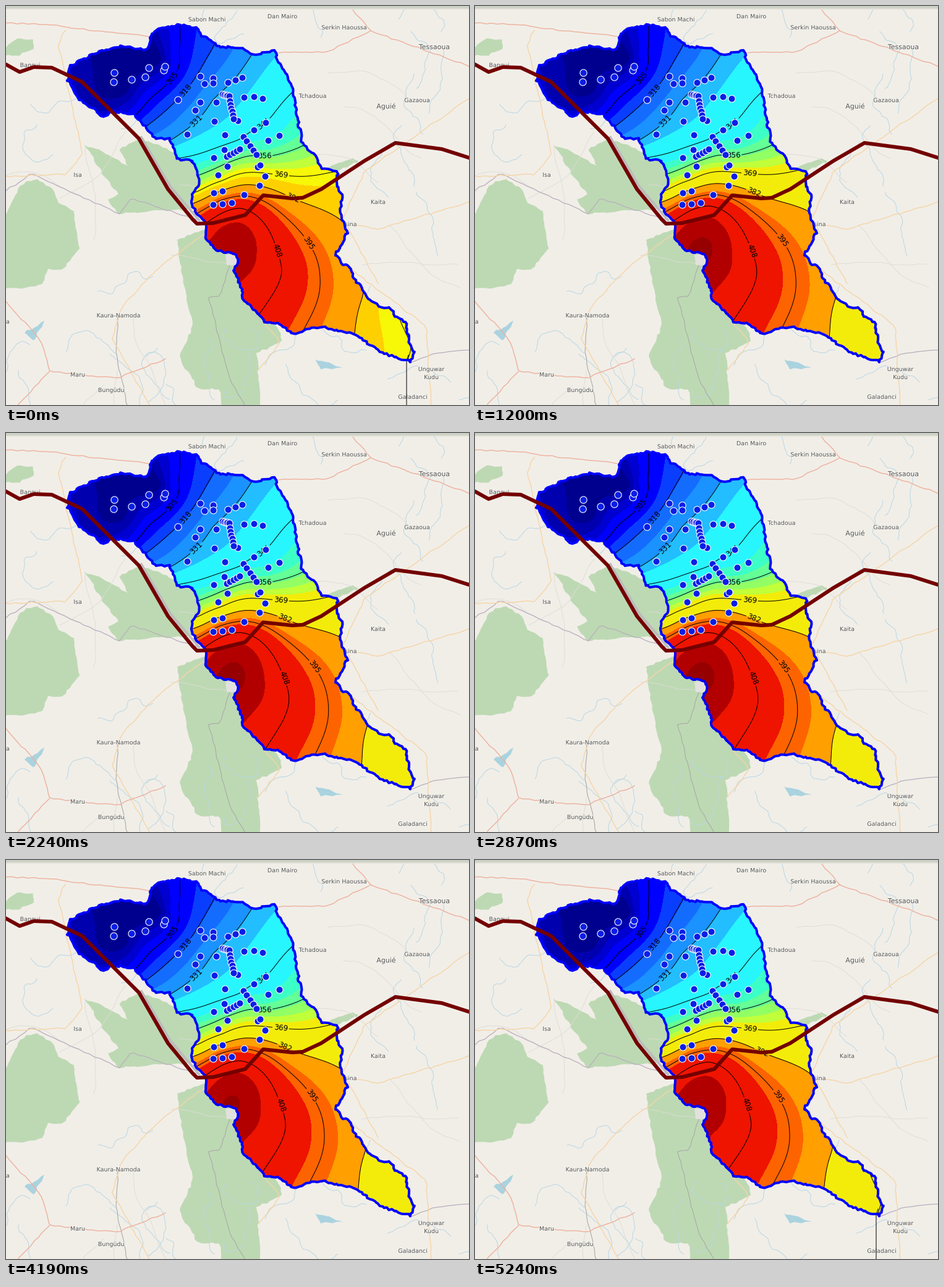
Recreate the animation shown at these times as a matplotlib script. Size 749 px wide and 647 px high, loop 5690 ms.

```python
import math
import numpy as np
import matplotlib.pyplot as plt
from matplotlib.animation import FuncAnimation
from matplotlib.patches import Polygon
from matplotlib.patheffects import withStroke

W, H, DPI = 749, 647, 64
PX = 72 / DPI
STEP = 10
HOLDS = [300, 900, 1040, 1050, 900, 1050, 450]
STARTS = np.cumsum([0] + HOLDS[:-1])
LOOP = sum(HOLDS)

# Key corners of the region, clockwise from the north.
NORTH_EAST = [
    (236, 45), (248, 36), (282, 30), (310, 36), (316, 47), (345, 66), (383, 68), (400, 80),
    (435, 72), (440, 90), (462, 125), (470, 175), (480, 225), (500, 243), (512, 263), (536, 268),
    (536, 290), (544, 310), (541, 335), (552, 368), (533, 403), (546, 420), (558, 424),
    (562, 440), (585, 472), (605, 488), (620, 488), (632, 505), (648, 515), (653, 550),
    (660, 560), (655, 577)]
SOUTH_WEST = [
    (610, 563), (565, 533), (510, 520), (490, 524), (468, 533), (440, 514), (420, 512),
    (384, 475), (380, 455), (367, 428), (375, 420), (374, 404), (340, 396), (322, 378),
    (324, 352), (300, 325), (302, 305), (312, 290), (310, 268), (300, 250), (276, 248),
    (265, 215), (243, 215), (205, 175), (170, 170), (158, 180), (118, 150), (100, 120),
    (103, 98), (150, 74), (190, 65), (228, 72), (236, 45)]

# Known heights of the surface, by level.
HEIGHTS = {
    281: [(205, 96)],
    284: [(140, 105), (252, 84), (195, 142)],
    291: [(103, 118), (150, 174)],
    298: [(263, 36), (266, 80), (222, 143)],
    305: [(281, 32), (281, 85), (262, 125), (208, 178)],
    318: [(337, 62), (290, 138), (226, 196)],
    331: [(397, 80), (335, 152), (265, 218)],
    344: [(464, 139), (412, 195), (380, 215), (276, 248)],
    349: [(468, 178), (390, 222)],
    356: [(481, 226), (418, 244), (350, 258)],
    369: [(536, 268), (445, 274), (350, 283), (309, 301), (655, 555), (650, 574)],
    373.5: [(603, 487)],
    382: [(545, 350), (464, 312), (385, 290), (303, 320), (577, 470), (564, 530)],
    395: [(345, 316), (420, 318), (490, 385), (508, 440), (480, 528)],
    408: [(324, 352), (378, 328), (438, 395), (446, 430), (415, 492)],
    416: [(335, 374), (368, 352), (405, 400), (384, 442)],
    423.6: [(366, 395)],
}
LINES = [305, 318, 331, 344, 356, 369, 382, 395, 408]
EDGES = [200, 284, 290, 298, 312, 318.5, 325, 331, 336, 349, 353, 357, 361, 365, 373.5, 382,
         391.3, 399, 416, 424.2, 500]
BANDS = ['#00008f', '#0000ae', '#0000d0', '#0000ff', '#0a3eff', '#146cff', '#1a92ff', '#22beff',
         '#28f6ff', '#3cffc8', '#64ff96', '#92ff64', '#c0ff3a', '#f7f708', '#ffd000', '#ff9f00',
         '#fd6400', '#ee1400', '#b20000', '#960000']
GOLD = slice(13, 15)

# Lone wells, and rows of wells given by both ends and a count.
WELLS = [
    (175, 108), (174, 123), (203, 119), (225, 115), (231, 100), (255, 104), (257, 98),
    (278, 152), (293, 208), (306, 169), (314, 156), (314, 114), (321, 126), (340, 156),
    (337, 187), (385, 148), (401, 147), (415, 150), (375, 186), (420, 189), (401, 201),
    (424, 218), (442, 210), (354, 209), (353, 233), (336, 246), (358, 260), (343, 274),
    (419, 276), (410, 291), (385, 306)]
ROWS = [((335, 117), (335, 125), 2), ((359, 124), (382, 116), 3), ((350, 143), (361, 146), 5),
        ((362, 154), (368, 183), 6), ((384, 212), (405, 241), 5), ((357, 244), (378, 232), 5),
        ((407, 261), (411, 258), 2), ((336, 303), (350, 300), 2), ((335, 322), (365, 319), 3)]
PIPE = [(-5, 92), (22, 107), (45, 99), (74, 100), (123, 123), (165, 165), (215, 215), (262, 297),
        (302, 346), (309, 353), (335, 352), (387, 339), (416, 307), (463, 312), (480, 311),
        (510, 297), (580, 251), (630, 222), (705, 232), (755, 248)]

FORESTS = [
    [(-5, 345), (20, 297), (34, 283), (52, 281), (76, 298), (88, 322), (110, 332), (118, 393),
     (92, 426), (66, 427), (60, 452), (30, 458), (-5, 458)],
    [(128, 225), (160, 238), (198, 260), (184, 232), (215, 215), (245, 225), (300, 250),
     (312, 290), (300, 330), (240, 332), (180, 337), (166, 314), (182, 304), (158, 275)],
    [(277, 380), (325, 360), (368, 405), (387, 480), (440, 520), (447, 545), (406, 562),
     (411, 652), (350, 652), (345, 622), (310, 620), (280, 570), (302, 520), (284, 430)],
    [(-5, 70), (20, 52), (45, 55), (46, 68), (20, 80), (-5, 80)],
    [(520, 262), (558, 247), (572, 251), (530, 270)]]
LAKES = [[(30, 530), (62, 511), (45, 543)], [(500, 572), (546, 587), (508, 588)]]
MINOR_ROADS = [
    [(96, 40), (84, 62), (124, 240), (98, 273), (0, 276)],
    [(322, 368), (240, 430), (186, 490), (172, 540), (232, 647)],
    [(545, 345), (580, 268), (749, 150)],
    [(548, 352), (600, 362), (749, 318)],
    [(548, 352), (602, 450)],
    [(556, 425), (680, 520), (688, 647)],
    [(415, 512), (444, 545), (409, 590)]]
MAIN_ROADS = [
    [(0, 480), (58, 545), (70, 592), (180, 604), (258, 572)],
    [(70, 592), (20, 647)],
    [(0, 28), (70, 30), (128, 38), (236, 50)],
    [(555, 0), (590, 40), (690, 76), (749, 98)],
    [(440, 76), (520, 74), (590, 40)]]
BORDERS = [[(0, 300), (40, 272), (184, 337), (202, 312), (312, 347)],
           [(655, 577), (700, 562), (749, 558)]]
RAILS = [[(182, 500), (177, 560), (196, 647)],
         [(362, 420), (346, 470), (328, 472), (360, 600), (386, 647)]]
TOWNS = [
    ('Sabon Machi', 325, 21), ('Dan Mairo', 447, 16), ('Serkin Haoussa', 547, 34),
    ('Tessaoua', 693, 66), ('Tchadoua', 496, 145), ('Aguié', 615, 162), ('Gazaoua', 665, 152),
    ('Bangui', 39, 95), ('Isa', 116, 273), ('Kaita', 602, 317), ('Katsina', 550, 353),
    ('Kaura-Namoda', 182, 501), ('Maru', 116, 597), ('Bungüdu', 170, 622),
    ('Unguwar', 688, 588), ('Kudu', 688, 601), ('Galadanci', 658, 633), ('a', 3, 511)]
CITIES = {'Tessaoua', 'Aguié'}


def jagged(points, gap, jitter, seed):
    """Walk along a path in even steps, nudging each step at random."""
    p = np.array(points, float)
    dist = np.r_[0, np.cumsum(np.hypot(*np.diff(p, axis=0).T))]
    s = np.arange(0, dist[-1], gap)
    path = np.c_[np.interp(s, dist, p[:, 0]), np.interp(s, dist, p[:, 1])]
    path += np.random.default_rng(seed).uniform(-jitter, jitter, path.shape)
    return np.vstack([path, p[-1]])


def wander(rng, steps, bend):
    """A random path whose heading drifts a little at each step."""
    turn = rng.uniform(0, math.tau) + np.cumsum(rng.normal(0, bend, steps))
    start = rng.uniform((0, 0), (W, H))
    return start + 4 * np.cumsum(np.c_[np.cos(turn), np.sin(turn)], axis=0)


def kernel(a, b):
    r2 = ((a[:, None] - b[None]) ** 2).sum(-1)
    return .5 * r2 * np.log(r2 + 1e-12)


def fit_surface(gx, gy):
    """Thin-plate spline through the known heights."""
    pts = np.array([p for ps in HEIGHTS.values() for p in ps]) / 100
    vals = np.array([v for v, ps in HEIGHTS.items() for _ in ps])
    n = len(pts)
    flat = np.c_[np.ones(n), pts]
    system = np.block([[kernel(pts, pts) + 5e-4 * np.eye(n), flat],
                       [flat.T, np.zeros((3, 3))]])
    coef = np.linalg.solve(system, np.r_[vals, 0, 0, 0])
    q = np.c_[gx.ravel(), gy.ravel()] / 100
    z = kernel(q, pts) @ coef[:n] + np.c_[np.ones(len(q)), q] @ coef[n:]
    return z.reshape(gx.shape)


def bump(x, y, r):
    return np.exp(-((GX - x) ** 2 + (GY - y) ** 2) / r ** 2)


GX, GY = np.meshgrid(np.arange(90, 676, 3.0), np.arange(20, 596, 3.0))
SURFACE = fit_surface(GX, GY)
SLOPE = np.clip((GY - 200) / 150, 0, 1)
RISE = 2.4 * SLOPE ** 2 * (3 - 2 * SLOPE) + 1.4 * bump(366, 397, 55) + 2 * bump(190, 105, 60)
OUTLINE = jagged(NORTH_EAST + SOUTH_WEST, 4, 1.7, 4)


def stroke(ax, path, color, width, z):
    x, y = np.transpose(path)
    ax.plot(x, y, color=color, lw=width * PX, zorder=z, solid_joinstyle='round')


def draw_map(ax):
    for group, color in ((FORESTS, '#bdd9b3'), (LAKES, '#aad3df')):
        for i, pts in enumerate(group):
            edge = jagged(pts + pts[:1], 6, 1.5, i)
            ax.add_patch(Polygon(edge, fc=color, ec='none', zorder=1))
    rng = np.random.default_rng(12)
    for _ in range(34):
        stroke(ax, wander(rng, 30, .35), '#b9d7e3', 1, 2)
    for _ in range(14):
        stroke(ax, wander(rng, 40, .1), '#dedcd6', .9, 2)
    for group, color, width in ((BORDERS, '#b9afbd', 1.3), (RAILS, '#aaa9a8', 1.1),
                                (MINOR_ROADS, '#f6d5a6', 1.4), (MAIN_ROADS, '#eeb09c', 1.4)):
        for i, pts in enumerate(group):
            stroke(ax, jagged(pts, 9, 1.2, i), color, width, 2)
    stroke(ax, [(219, 213), (266, 293), (312, 347)], '#bdbbbd', 4, 2)
    ax.add_patch(Polygon([(355, 403), (374, 403), (374, 420), (357, 420)], fc='#e3e1de', zorder=2))
    ax.axhspan(0, 4, color='#cdd2c6', zorder=3, lw=0)
    ax.axhspan(4, 6, color='#e4e4dc', zorder=3, lw=0)
    halo = [withStroke(linewidth=2 * PX, foreground='#f6f4ef')]
    for name, x, y in TOWNS:
        size = 11 if name in CITIES else 9.5
        ax.text(x, y, name, size=size * PX, color='#555555', ha='center', va='center_baseline',
                family='DejaVu Sans', path_effects=halo, zorder=4)


def draw_surface(ax, k):
    grow = abs(math.sin(math.pi * k / 6.2)) ** 1.2
    low = grow < .2
    z = SURFACE + grow * RISE
    bands = list(BANDS)
    if k:
        bands[GOLD] = ['#f3ec0a'] * 2
    region = Polygon(OUTLINE, fc='none', ec='#0000ff', lw=4 * PX, joinstyle='round', zorder=7)
    ax.add_patch(region)
    fill = ax.contourf(GX, GY, z, levels=EDGES, colors=bands, zorder=5)
    lines = ax.contour(GX, GY, z, levels=LINES, colors='k', linewidths=PX, zorder=6)
    for art in (fill, lines):
        art.set_clip_path(region)
    spots = [(267, 115), (291, 137), (303, 181), (417, 191), (418, 244), (444.5, 274 - 4 * grow),
             (464, 311) if low else (451, 306 - 4 * grow),
             (490 + 8 * grow, 384 - 4 * grow), (439 + 11 * grow, 397)]
    lines.clabel(manual=spots, inline=True, inline_spacing=2, fmt='%d', fontsize=12 * PX,
                 colors='k', zorder=6.5)
    if low:
        foot = 648 + 15 * grow
        stroke(ax, [(foot + 3, 566), (foot, 576), (foot, H)], 'k', 1, 6)


def draw_wells(ax):
    rows = [np.linspace(a, b, n) for a, b, n in ROWS]
    x, y = np.vstack([WELLS] + rows).T
    ax.plot(x, y, 'o', ms=11.2 * PX, mfc='#0a1ee6', mec='white', mew=1.1 * PX, zorder=9)


def draw_still(fig, k):
    fig.clf()
    ax = fig.add_axes([0, 0, 1, 1])
    ax.axis('off')
    ax.set(xlim=(0, W), ylim=(H, 0), autoscale_on=False)
    draw_map(ax)
    draw_surface(ax, k)
    stroke(ax, PIPE, '#730000', 6, 8)
    draw_wells(ax)
    fig.canvas.draw()
    return np.array(fig.canvas.buffer_rgba())


fig = plt.figure(figsize=(W / DPI, H / DPI), dpi=DPI, facecolor='#f1eee8')
# Every still is drawn once; the loop only switches between them.
stills = [draw_still(fig, k) for k in range(len(HOLDS))]
fig.clf()
screen = fig.figimage(stills[0])


def update(i):
    k = np.searchsorted(STARTS, i * STEP, side='right') - 1
    screen.set_data(stills[k])
    return [screen]


anim = FuncAnimation(fig, update, frames=LOOP // STEP, interval=STEP, repeat=True,
                     repeat_delay=0, cache_frame_data=False)
plt.show()
```
